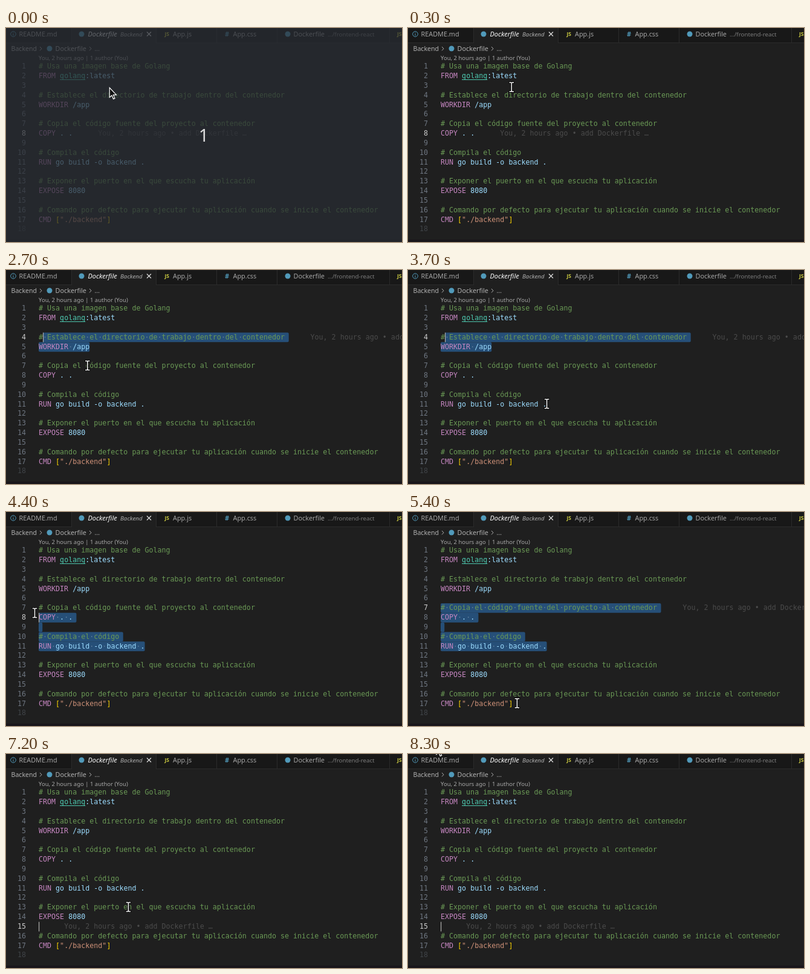
Write an HTML page with a canvas that moves like this. It is 655 by 354 pixels and loops after 8.5 s.

```html
<!DOCTYPE html>
<html lang="es">
<head>
<meta charset="utf-8">
<title>Dockerfile</title>
<style>
  html, body { margin: 0; height: 100%; overflow: hidden; background: #1f1f1f; }
  canvas { display: block; }
</style>
</head>
<body>
<canvas id="stage" width="655" height="354"></canvas>
<script>
const ctx = document.getElementById('stage').getContext('2d');
const LOOP = 8500, STEP = 100, MAX_MOVE = 700;
const LEFT = 54, TOP = 56, ROW = 95 / 6, CHAR = 7.024;
const MONO = '11.667px "DejaVu Sans Mono", monospace';
const ui = (size, style = '') => `${style} ${size}px "Noto Sans", sans-serif`;
const TAB = ui(10.83), SMALL = ui(9.75);
const BLUE = '#519aba', YELLOW = '#cbcb41', GRAY = '#a4a4a4';
const BLAME = 'You, 2 hours ago • add Dockerfile …';

const lines = `# Usa una imagen base de Golang
FROM golang:latest

# Establece el directorio de trabajo dentro del contenedor
WORKDIR /app

# Copia el código fuente del proyecto al contenedor
COPY . .

# Compila el código
RUN go build -o backend .

# Exponer el puerto en el que escucha tu aplicación
EXPOSE 8080

# Comando por defecto para ejecutar tu aplicación cuando se inicie el contenedor
CMD ["./backend"]
`.split('\n');

// comment, keyword, image, string, bracket, plain
const TOKEN = /(^#.*)|(^[A-Z]+)|(golang)|(".*?")|([[\]])|([^ ["\]]+)/g;
const COLORS = ['#6a9955', '#c586c0', '#4ec9b0', '#ce9178', '#ffd700', '#9cdcfe'];

// Pointer stops in text coordinates: arrival time, row, column, button held on the way
const stops = [
  [0, 2.2, 16.7],
  [1000, 1, 18], [1200, -0.5, 0, true], [1400, 1, 0, true],
  [2300, 4, 12], [2500, 3, 1, true], [2700, 6, 11.5],
  [3500, 10, 25], [4500, 6, -1, true],
  [5400, 16, 18], [5700, 12, 2, true],
  [6700, 14, 26.5], [6800, 14, 26.5, true],
  [7800, 0, 12], [LOOP - 200, -5, -1]
].map(([end, row, col, drag], i, all) => ({
  end, drag, x: LEFT + col * CHAR, y: TOP + (row + 0.5) * ROW,
  start: i ? Math.max(all[i - 1][0], end - MAX_MOVE) : 0
}));

const clamp = (v, lo, hi) => Math.max(lo, Math.min(hi, v));
const rowTop = row => TOP + row * ROW;
const baseline = row => Math.floor(rowTop(row) + 11.8);

function pointer(t) {
  const i = stops.findLastIndex(s => s.start < t);
  if (i < 1) return stops[0];
  const from = stops[i - 1], to = stops[i];
  const k = Math.min(1, (t - to.start) / (to.end - to.start));
  return {
    x: from.x + (to.x - from.x) * (1 - (1 - k) ** 3),
    y: from.y + (to.y - from.y) * k
  };
}

function hit({ x, y }) {
  const row = clamp(Math.floor((y - TOP) / ROW), 0, lines.length - 1);
  return { row, col: clamp(Math.round((x - LEFT) / CHAR), 0, lines[row].length) };
}

function selection(t) {
  const last = stops.findLastIndex(s => s.drag && s.start < t);
  if (last < 0) {
    const caret = { row: 7, col: 8 };
    return { anchor: caret, caret, idle: t + 600 };
  }
  let press = last;
  while (stops[press].drag) press--;
  const { end } = stops[last];
  return {
    anchor: hit(stops[press]),
    caret: hit(pointer(Math.min(t, end))),
    idle: Math.max(0, t - end)
  };
}

// The blame note follows once the caret has rested on a row
function noteRow(t) {
  const [row, before] = [1, 2].map(n => selection(t - n * STEP).caret.row);
  return row === before ? row : -1;
}

function rect(x, y, w, h, color) {
  ctx.fillStyle = color;
  ctx.fillRect(x, y, w, h);
}

function text(str, x, y, font, color, align = 'left') {
  ctx.font = font;
  ctx.fillStyle = color;
  ctx.textAlign = align;
  ctx.fillText(str, x, y);
}

function disc(x, y) {
  ctx.fillStyle = BLUE;
  ctx.beginPath();
  ctx.arc(x, y, 4.5, 0, 7);
  ctx.fill();
}

function stroke(d, color, width = 1) {
  ctx.strokeStyle = color;
  ctx.lineWidth = width;
  ctx.stroke(new Path2D(d));
}

function drawTabs() {
  rect(0, 0, 655, 25, '#181818');
  rect(0, 24, 655, 1, '#2b2b2b');
  rect(109, 0, 139, 25, '#1f1f1f');
  for (const x of [108, 248, 348, 448, 634]) rect(x, 0, 1, 25, '#2b2b2b');

  stroke('M7.7 10a4.3 4.3 0 1 0 8.6 0a4.3 4.3 0 1 0 -8.6 0M12 7.4v1M12 9.4v3.2', BLUE);
  text('README.md', 21.5, 14, TAB, GRAY);
  disc(125, 10);
  text('Dockerfile', 135.5, 14, ui(11, 'italic'), '#fff');
  text('Backend', 189, 14, ui(9.75, 'italic'), '#b0b0b0');
  stroke('M233 6.5l7 7M240 6.5l-7 7', '#ddd', 1.2);
  text('JS', 262.5, 13, ui(8.5, 'bold'), YELLOW);
  text('App.js', 276, 14, TAB, GRAY);
  text('#', 362, 14, ui(11, 'bold'), BLUE);
  text('App.css', 375.5, 14, TAB, GRAY);
  disc(466, 10);
  text('Dockerfile', 475.5, 14, TAB, GRAY);
  text('…/frontend-react', 532, 14, SMALL, '#7c7c7c');
  text('JS', 647, 13, ui(8.5, 'bold'), YELLOW);
}

function drawBreadcrumbs() {
  text('Backend', 8.5, 38, ui(10.6), '#b0b0b0');
  for (const x of [56, 138]) stroke(`M${x} 31l3 3.2l-3 3.2`, '#b0b0b0');
  disc(72, 34);
  text('Dockerfile', 81.5, 38, TAB, '#b0b0b0');
  text('…', 146.5, 38, TAB, '#b0b0b0');
  text('You, 2 hours ago | 1 author (You)', LEFT, 53, ui(9.5), '#a8a8a8');
}

function drawSelection(anchor, caret) {
  const [from, to] = [anchor, caret].sort((a, b) => a.row - b.row || a.col - b.col);
  for (let row = from.row; row <= to.row; row++) {
    const start = row === from.row ? from.col : 0;
    const end = row === to.row ? to.col : lines[row].length;
    const width = (end - start) * CHAR + (row < to.row ? 6.3 : 0);
    ctx.fillStyle = '#264f78';
    ctx.beginPath();
    ctx.roundRect(LEFT + start * CHAR, rowTop(row), width, ROW, 2);
    ctx.fill();
    for (let col = start; col < end; col++)
      if (lines[row][col] === ' ') text('·', LEFT + col * CHAR, baseline(row), MONO, '#5b7c9b');
  }
}

function drawCode(activeRow) {
  lines.forEach((line, row) => {
    const y = baseline(row);
    const color = row === activeRow ? '#ccc' : row === lines.length - 1 ? '#3f4347' : '#6e7681';
    text(row + 1, 33, y, MONO, color, 'right');
    for (const m of line.matchAll(TOKEN)) {
      const kind = m.slice(1).findIndex(Boolean);
      const x = LEFT + m.index * CHAR;
      text(m[0], x, y, MONO, COLORS[kind]);
      if (kind === 2) rect(x, y + 2, m[0].length * CHAR, 1, COLORS[kind]);
    }
  });
}

function drawPointer({ x, y }, arrow) {
  ctx.save();
  ctx.translate(x, y);
  if (arrow) {
    const shape = 'M0 0V16L3.7 12.7 6.3 18.6 8.7 17.6 6.2 11.8H11.2Z';
    ctx.fillStyle = '#111';
    ctx.fill(new Path2D(shape));
    stroke(shape, '#fff', 1.2);
  } else {
    const beam = 'M-3 -8.5H-1L0 -7.5 1 -8.5H3M0 -7.5V5.5M-3 6.5H-1L0 5.5 1 6.5H3';
    ctx.lineCap = 'square';
    stroke(beam, '#000', 3.4);
    stroke(beam, '#fff', 1.5);
  }
  ctx.restore();
}

function draw(t) {
  const { anchor, caret, idle } = selection(t);
  const note = noteRow(t);
  const countdown = t < STEP;
  const mouse = pointer(t);

  rect(0, 0, 655, 354, '#1f1f1f');
  rect(0, 350, 655, 4, '#19161a');
  drawTabs();
  drawBreadcrumbs();
  drawSelection(anchor, caret);
  drawCode(caret.row);
  if (note >= 0)
    text(BLAME, LEFT + (lines[note].length + 6) * CHAR, baseline(note), MONO, '#4b4b4b');
  if (idle % 1000 <= 500)
    rect(LEFT + caret.col * CHAR, rowTop(caret.row), 1.2, ROW, '#aeafad');
  if (countdown) {
    rect(0, 0, 655, 354, 'rgba(39, 43, 51, .72)');
    text('1', 327, 188, ui(29), '#dcdcdc', 'center');
  }
  drawPointer(mouse, countdown || mouse.y < 44);
}

function tick() {
  const t = performance.now() % LOOP;
  draw(Math.floor(t / STEP) * STEP);
  requestAnimationFrame(tick);
}
tick();
</script>
</body>
</html>
```
